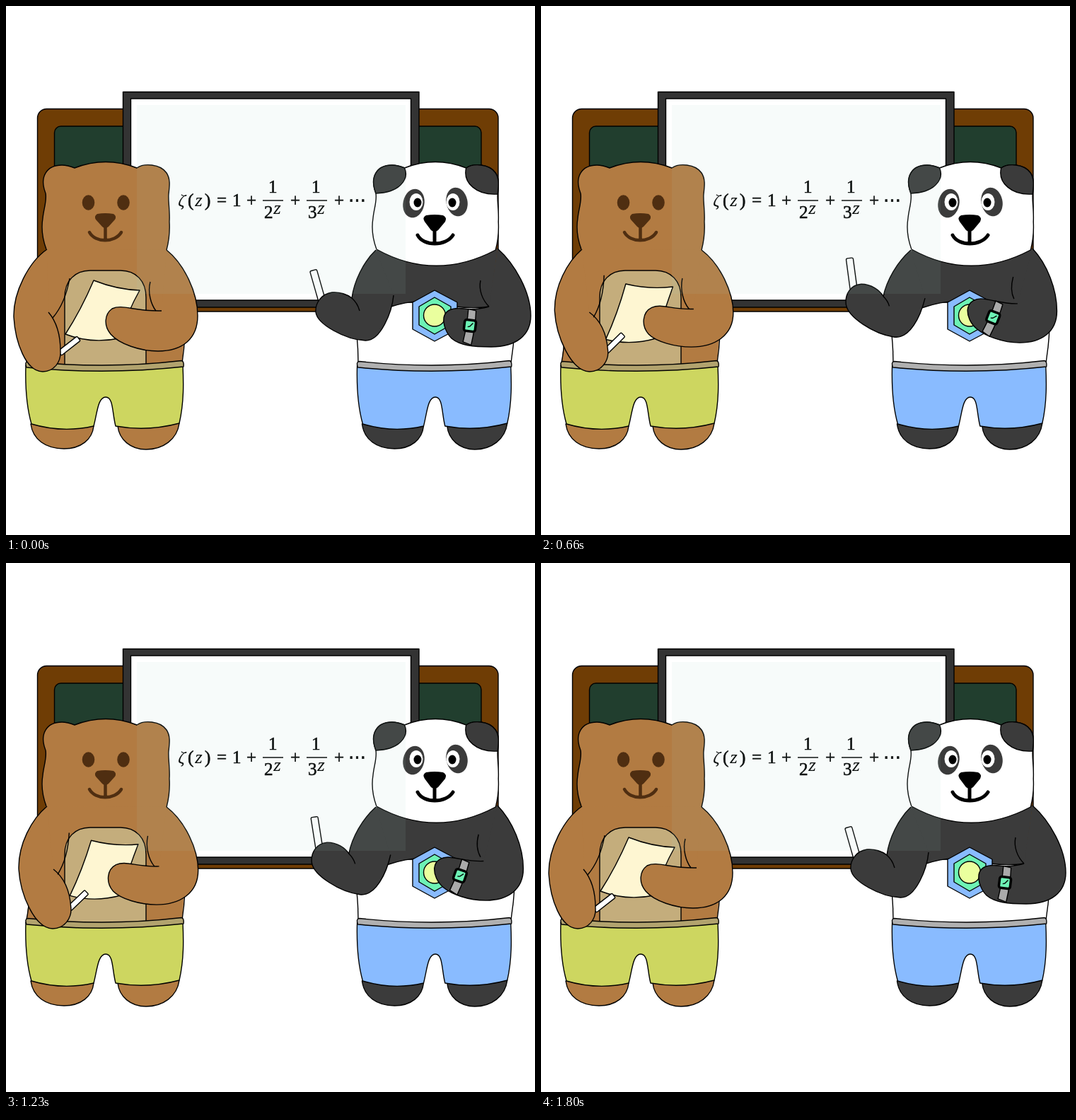
An HTML page that plays this animation: 748 by 748 pixels, repeating every 1.83 s.

```html
<!DOCTYPE html>
<html lang="en">
<head>
<meta charset="utf-8">
<title>Bear and panda at the board</title>
<style>
  html, body { margin: 0; width: 100%; height: 100%; overflow: hidden; background: #fff; }
  svg { display: block; width: 100vw; height: 100vh; }
  path, rect, circle, polygon { stroke: #000; stroke-width: 1.4; stroke-linejoin: round; }
  .plain, .plain * { stroke: none; }
  .line { fill: none; }
  .fur { fill: #b27b42; }
  .dark { fill: #3b3b3b; }
  .brown { fill: #4f2e11; }
  .smile { fill: none; stroke-linecap: round; }
  text { font: 25px "Liberation Serif", "Times New Roman", serif; stroke: #000; stroke-width: .6; }
  .var { font: italic 22px "Noto Serif", serif; stroke: none; }
</style>
</head>
<body>
<svg viewBox="0 0 748 748">
  <defs>
    <path id="legs" d="M35 591C38 613 56 626 82 626C106 626 122 613 124 594ZM158 594C160 613 176 627 198 627C222 627 242 613 245 590Z"/>
    <path id="shorts" d="M28 508C27 540 30 570 36 591Q80 604 124 594C129 575 130 553 141 553C152 553 150 575 155 594Q200 602 245 590C252 560 251 530 250 508Z"/>
    <path id="band" d="M31 502.500Q140 514 248 501.500Q252 502 251 510Q140 522 29 511Q26 503 31 502.500Z"/>
  </defs>

  <!-- boards -->
  <rect x="44.500" y="145.500" width="651.500" height="286.500" rx="13" fill="#6f3d05"/>
  <rect x="68.500" y="170" width="603.500" height="238" rx="9" fill="#213e2e"/>
  <rect x="165.500" y="121.500" width="418.500" height="304.500" fill="#333"/>
  <rect x="176.500" y="131" width="396" height="285" fill="#fff"/>

  <!-- formula -->
  <g>
    <text class="var" x="243" y="283">ζ</text>
    <text x="257" y="283">(</text>
    <text class="var" x="267" y="283">z</text>
    <text x="281" y="283">)</text>
    <text x="298" y="283">=</text>
    <text x="320" y="283">1</text>
    <text x="340" y="283">+</text>
    <text x="371" y="264">1</text>
    <text x="365" y="300">2</text>
    <text class="var" x="378" y="294">z</text>
    <text x="402" y="283">+</text>
    <text x="432" y="264">1</text>
    <text x="427" y="300">3</text>
    <text class="var" x="440" y="294">z</text>
    <text x="464" y="283">+</text>
    <text x="484" y="283">⋯</text>
    <path d="M363 275H392M425 275H454"/>
  </g>

  <!-- bear -->
  <use href="#legs" class="fur"/>
  <use href="#shorts" fill="#cdd660"/>
  <path class="fur plain" d="M57 343H227L252 430V470L249 506Q140 514 29 504L33 470 28 420Z"/>
  <path class="line" d="M33 470Q32 490 29 504M253 465Q252 485 249 505"/>
  <path fill="#c4ad7c" d="M83 508V412C83 389 97 374 119 374H162C184 374 198 389 198 412V508"/>
  <use href="#band" fill="#b2a36e"/>
  <path id="paper" fill="#fef6d2"/>
  <path id="bearRight" class="fur"/>
  <path id="bearRightFold" class="line"/>
  <g id="bearChalk"><rect y="-4" width="34" height="8" rx="1.500" fill="#fff"/></g>
  <path id="bearLeft" class="fur"/>
  <path id="bearLeftFold" class="line"/>
  <path id="bearHead" class="fur"/>
  <g class="brown plain">
    <ellipse cx="116.500" cy="278" rx="8.800" ry="10.700"/>
    <ellipse cx="166" cy="278" rx="8.800" ry="10.700"/>
    <path d="M129 294Q140 292 152 294Q157 297 154 302L145 312Q140 316 136 312L127 302Q124 297 129 294Z"/>
  </g>
  <path class="smile" style="stroke:#4f2e11;stroke-width:4.500" d="M140.500 311V329M118 320C126 335 154 335 163 320"/>

  <!-- panda -->
  <g transform="translate(469.200) scale(.978 1)">
    <use href="#legs" class="dark"/>
    <use href="#shorts" fill="#89bbff"/>
  </g>
  <path class="plain" fill="#fff" d="M497 420H719L714 506Q608 514 499 505Z"/>
  <path class="line" d="M496 465Q498 485 498 504M719 455Q718 480 714 505"/>
  <g transform="translate(469.200) scale(.978 1)">
    <use href="#band" fill="#b0b0b0"/>
  </g>
  <path class="dark plain" d="M523 345L538 427Q580 413 608 420Q650 430 684 425L695 343Z"/>
  <path class="line" d="M538 427Q580 413 608 420Q650 430 684 425"/>
  <polygon fill="#89bbff" points="606,402 638,419 638,457 606,474 575,457 575,419"/>
  <polygon fill="#6df2b5" points="606,412 629,425 629,451 606,464 584,451 584,425"/>
  <circle cx="606" cy="437.500" r="15.500" fill="#eaff9e"/>
  <g id="pandaChalk"><rect x="-5" y="-42" width="10" height="50" rx="2" fill="#fff"/></g>
  <path id="pandaLeft" class="dark"/>
  <path id="pandaLeftFold" class="line"/>
  <path id="pandaRight" class="dark"/>
  <path id="pandaRightFold" class="line"/>
  <g id="watch">
    <path fill="#aaa" d="M-5 -23L6 -22Q8 0 5 27L-7 24Q-4 0 -5 -23Z"/>
    <rect x="-8" y="-8" width="16" height="16" rx="3" fill="#6df2b5" style="stroke-width:3.500"/>
    <path class="line" d="M-3 2L0 1 4 -4"/>
  </g>
  <g transform="translate(467.500) scale(.99 1)">
    <path id="pandaHead" fill="#fff"/>
    <path class="dark" d="M56 265C47 242 57 225 79 225C86 225 92 227 97 229C104 245 90 264 56 265Z"/>
    <path class="dark" d="M185 229C195 222 218 223 227 236C233 245 231 256 230 266C200 268 180 250 185 229Z"/>
  </g>
  <g class="plain">
    <ellipse class="dark" cx="576.500" cy="279" rx="15" ry="20.500" transform="rotate(12 576.500 279)"/>
    <ellipse class="dark" cx="637.500" cy="277" rx="15" ry="20.500" transform="rotate(-12 637.500 277)"/>
    <g fill="#fff">
      <ellipse cx="580" cy="277" rx="9.500" ry="12"/>
      <ellipse cx="632" cy="277" rx="9.500" ry="12"/>
    </g>
    <ellipse cx="582" cy="278" rx="5.500" ry="6.500"/>
    <ellipse cx="631" cy="278" rx="5.500" ry="6.500"/>
    <path d="M594 296Q606 294 618 296Q624 299 621 305L611 317Q606 321 601 317L592 305Q588 299 594 296Z"/>
  </g>
  <path class="smile" style="stroke-width:5" d="M606 315V334M582 324C590 340 622 340 632 324"/>

  <!-- glass sheen -->
  <rect class="plain" x="185" y="140" width="380" height="267" fill="rgba(163,209,197,.087)"/>
</svg>
<script>
const $ = id => document.getElementById(id);

const head = "M57 344C50 325 50 312 52 300C53 288 58 275 56 265C47 242 57 225 79 225" +
  "C86 225 92 227 97 229Q141 212 185 229C195 222 218 223 227 236C233 245 231 256 230 266" +
  "C229 274 232 290 231 305C232 322 230 334 227 345";
$("bearHead").setAttribute("d", head);
$("pandaHead").setAttribute("d", head + "Q141 390 57 344Z");

// Each moving part: attribute, value when lowered, value when raised
const parts = {
  paper: ["d",
    "M124 388Q157 401 189 402Q172 432 160 470Q120 478 84 464Q106 430 124 388Z",
    "M119 394Q152 401 186 396Q175 430 163 470Q128 481 93 473Q109 435 119 394Z"],
  bearRight: ["d",
    "M227 345C252 365 271 405 271 438C271 470 250 488 215 488C190 488 160 478 148 464C138 452 139 436 150 428C165 421 180 432 220 431",
    "M227 345C254 365 272 405 272 433C272 465 245 481 212 481C190 481 163 474 153 464C142 452 144 432 158 426C172 420 185 429 215 428"],
  bearRightFold: ["d",
    "M204 390C200 405 205 422 212 431",
    "M199 384C196 400 200 418 209 428"],
  bearChalk: ["transform",
    "translate(76 491) rotate(-38)",
    "translate(95 488) rotate(-46)"],
  bearLeft: ["d",
    "M58 344C32 362 10 405 11 440C13 475 28 517 52 517C68 517 78 503 77 488C77 468 72 447 60 433",
    "M58 344C38 362 20 395 21 430C23 465 45 516 72 517C90 517 100 500 98 486C96 465 88 445 70 433"],
  bearLeftFold: ["d",
    "M90 385C86 408 78 427 66 441",
    "M89 380C89 405 84 425 76 440"],
  pandaChalk: ["transform",
    "translate(446 414) rotate(-16)",
    "translate(441 395) rotate(-6)"],
  pandaLeft: ["d",
    "M523 345C505 362 492 390 489 413C483 408 472 404 461 405C446 407 437 420 438 433C440 450 480 472 508 473C530 474 546 432 548 409",
    "M523 345C503 362 488 388 483 410C478 401 466 391 451 391C436 392 428 405 430 420C433 438 468 462 497 467C520 471 535 440 542 414"],
  pandaLeftFold: ["d",
    "M489 413Q497 420 500 431",
    "M483 410Q489 416 491 423"],
  pandaRight: ["d",
    "M695 343C720 365 742 405 742 438C742 465 722 482 686 482C660 482 642 480 630 470C622 462 618 450 619 441C621 430 632 426 648 428C660 430 672 428 683 425",
    "M695 343C715 365 727 400 727 430C727 460 705 475 675 475C650 475 625 463 615 455C604 447 600 436 600 428C601 415 612 409 625 412C640 414 652 420 672 420"],
  pandaRightFold: ["d",
    "M671 388C668 402 674 416 683 425",
    "M667 382C663 396 664 406 666 412"],
  watch: ["transform",
    "translate(656 452) rotate(7)",
    "translate(636 438) rotate(24)"]
};

// Blends every number of one string towards its partner in the other
function mix(a, b, k) {
  const number = /-?[\d.]+/g, ends = b.match(number);
  let i = 0;
  return a.replace(number, n => +(+n + (ends[i++] - n) * k).toFixed(2));
}

const LOOP = 1830, STEP = 30, SWAY = 1800;
const start = performance.now();

function draw() {
  const t = Math.floor(((performance.now() - start) % LOOP) / STEP) * STEP;
  const k = (1 - Math.cos(2 * Math.PI * t / SWAY)) / 2;
  for (const id in parts) {
    const [attr, low, high] = parts[id];
    $(id).setAttribute(attr, mix(low, high, k));
  }
  requestAnimationFrame(draw);
}
draw();
</script>
</body>
</html>
```
